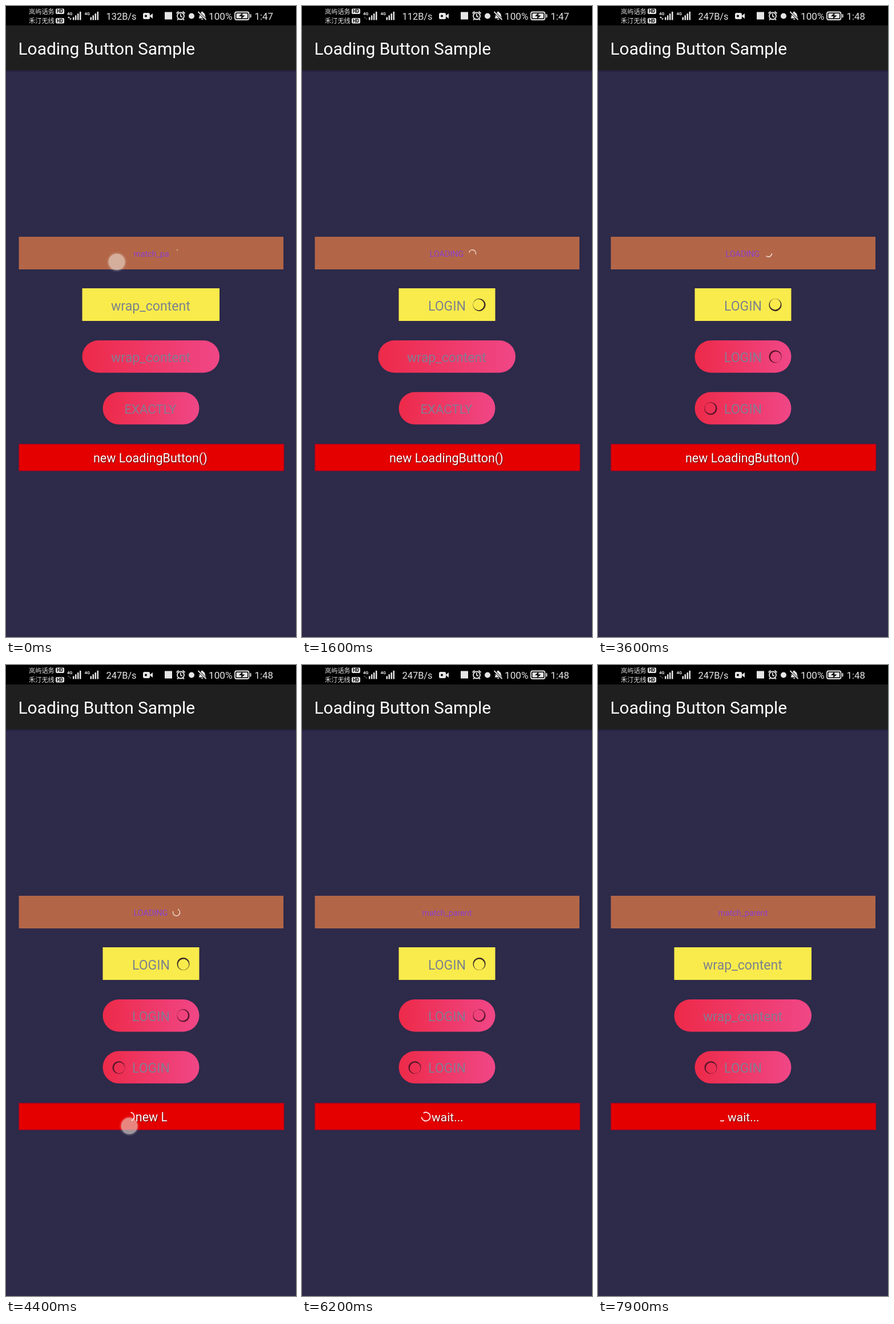
Write an HTML page that moves like this. It is 508x1102 px and loops after 8 s.

```html
<!DOCTYPE html>
<html lang="en">
<head>
<meta charset="utf-8">
<title>Loading Button Sample</title>
<style>
html, body { margin: 0; width: 100%; height: 100%; overflow: hidden; background: #2d2a4a; }
svg#stage { display: block; width: 100vw; height: 100vh; }
text { font-family: Roboto, "Open Sans", sans-serif; white-space: pre; }
.cjk { font-family: "Noto Sans CJK SC", "Noto Sans CJK", sans-serif; font-size: 11.2px; }
.status { fill: #e6e6e6; }
.line { fill: none; stroke: #e6e6e6; stroke-width: 1.8; }
.box { filter: blur(.45px); }
</style>
</head>
<body>
<svg id="stage" viewBox="0 0 508 1102" preserveAspectRatio="none">
  <defs>
    <linearGradient id="pink"><stop stop-color="#ed2a49"/><stop offset="1" stop-color="#f04787"/></linearGradient>
    <linearGradient id="shade" x2="0" y2="1"><stop stop-color="#15142a" stop-opacity=".6"/><stop offset="1" stop-color="#15142a" stop-opacity="0"/></linearGradient>
    <radialGradient id="halo"><stop offset=".75" stop-color="#fff" stop-opacity=".2"/><stop offset="1" stop-color="#fff" stop-opacity="0"/></radialGradient>
  </defs>
  <rect width="508" height="1102" fill="#2d2a4a"/>
  <rect width="508" height="34" fill="#000"/>
  <rect y="34" width="508" height="78" fill="#1f1f1f"/>
  <rect y="112" width="508" height="4" fill="url(#shade)"/>
  <text x="21.5" y="85.3" font-size="29.9" fill="#fff">Loading Button Sample</text>

  <g class="status">
    <text class="cjk" x="40" y="13.5">岚屿话务</text>
    <text class="cjk" x="40" y="30">禾汀无线</text>
    <g id="badges"></g>
    <g id="signals"></g>
    <path id="arrows" d="M108 21l2-3 2 3zM111 21.5h4l-2 3z"/>
    <text id="speed" x="175.5" y="24" font-size="16.4"></text>
    <rect x="240" y="12" width="12" height="11" rx="2.5"/>
    <path d="M252 17l5-4v9l-5-4z"/>
    <circle cx="245" cy="17.5" r="2" fill="#000"/>
    <rect x="278" y="10.5" width="13" height="13"/>
    <circle class="line" cx="306" cy="17.5" r="6"/>
    <path class="line" d="M306 13.5v4.5l3 1.5M298.5 13l4-3.5M313.5 13l-4-3.5M302 22.5l-2 2M310 22.5l2 2"/>
    <circle cx="325" cy="17.5" r="5"/>
    <path d="M337.5 21.5c2-2 1-9 4-10 1-2.5 3-2.5 4 0 4 1 3 8 5 10zM341.5 22.8h4.5q-2.2 3-4.5 0z"/>
    <path d="M337 10.5l14 14" stroke="#000" stroke-width="3.5"/>
    <path class="line" d="M336.5 10l14 14"/>
    <text x="355" y="24" font-size="17.2">100%</text>
    <rect class="line" x="401" y="10.5" width="24.5" height="13.5" rx="3"/>
    <rect x="403.5" y="13" width="19.5" height="8.5" rx="1"/>
    <path d="M414.5 11.5l-6.5 6.5h4.5l-1 5 7-6.5h-4.5z" fill="#000"/>
    <rect x="427.5" y="14" width="2" height="6.5" rx="1"/>
    <text id="clock" x="435.5" y="24" font-size="16.8"></text>
  </g>
  <g id="buttons"></g>
  <g id="touch">
    <circle r="18.5" fill="url(#halo)"/>
    <circle r="14.5" fill="#e8d8cc" fill-opacity=".5"/>
  </g>
</svg>
<script>
const LOOP = 8000, STEP = 100, SHRINK = 160, CYCLE = 1332;
const $ = id => document.getElementById(id);

function add(parent, tag, attrs = {}) {
  const node = document.createElementNS('http://www.w3.org/2000/svg', tag);
  set(node, attrs);
  parent.append(node);
  return node;
}
function set(node, attrs) {
  for (const key in attrs) node.setAttribute(key, attrs[key]);
}
const clamp = v => Math.max(0, Math.min(1, v));
const mix = (a, b, k) => a + (b - a) * k;
const show = (node, on) => set(node, { visibility: on ? 'visible' : 'hidden' });

for (const y of [4.5, 21]) {
  add($('badges'), 'rect', { x: 87, y, width: 15, height: 9.5, rx: 2 });
  add($('badges'), 'text', { x: 89, y: y + 7.8, 'font-size': 8.2, 'font-weight': 700, fill: '#000' }).textContent = 'HD';
}
for (const x of [107, 137.5]) {
  add($('signals'), 'text', { x, y: 16, 'font-size': 7.6, 'font-weight': 700 }).textContent = '4G';
  for (let i = 0; i < 4; i++) {
    const height = 5 + i * 3.2;
    add($('signals'), 'rect', { x: x + 10 + i * 4, y: 24.5 - height, width: 2.5, height });
  }
}

// wide and narrow are [left, right] of the box; idleText and busyText of the label
const LOGIN = [221, 288], FULL = [22.5, 486], WIDE = [133.5, 374], NARROW = [169.5, 338.5];
const GREY = '#867b92', DARK = '#58152a';
const buttons = [
  { y: 403, h: 57, wide: FULL, narrow: FULL, fill: '#b36647', color: '#8a40cf',
    idle: 'match_parent', busy: 'LOADING', idleSize: 14.2, busySize: 14.4, base: 437.6,
    idleText: [210.5, 298], busyText: [223.5, 286], click: -150, end: 4850, touch: [194, 447],
    arc: { x: 298.5, y: 432, r: 6, width: 1.4, color: '#f4e2da', offset: 3985, turn: 0 } },
  { y: 493, h: 57, wide: WIDE, narrow: NARROW, fill: '#f9eb4b', color: '#7c828e',
    idle: 'wrap_content', busy: 'LOGIN', idleSize: 23.1, busySize: 23.1, base: 531.5,
    idleText: [184, 323], busyText: LOGIN, click: 1300, end: 6400, touch: [220, 532],
    ring: { x: 310.5, y: 522, color: '#3d2b27', at: 1600, angle: 20 } },
  { y: 584, h: 56.5, wide: WIDE, narrow: NARROW, fill: 'url(#pink)', color: GREY, rx: 28.2,
    idle: 'wrap_content', busy: 'LOGIN', idleSize: 23.1, busySize: 23.1, base: 622,
    idleText: [184, 323], busyText: LOGIN, click: 2150, end: 7250, touch: [221, 627],
    ring: { x: 310.5, y: 612.3, color: DARK, at: 3600, angle: 220 } },
  { y: 674.3, h: 56.5, wide: NARROW, narrow: NARROW, fill: 'url(#pink)', color: GREY, rx: 28.2,
    idle: 'EXACTLY', busy: 'LOGIN', idleSize: 22.2, busySize: 23.1, base: 712.5,
    idleText: [207.5, 302], busyText: LOGIN, click: 3150, end: 9000, touch: [222, 716],
    ring: { x: 197.5, y: 703, color: DARK, at: 3600, angle: 40 } },
  { y: 765.5, h: 46, wide: [23, 486.5], narrow: [23, 486.5], fill: '#e50000', color: '#fff', border: '#b8001a',
    idle: 'new LoadingButton()', busy: 'wait...', idleSize: 21.5, busySize: 21, base: 797,
    idleText: [153, 355], busyText: [227, 282], click: 4250, end: 9000, touch: [216, 805],
    arc: { x: 217, y: 788.8, r: 7.6, width: 1.6, color: '#fff', offset: -2845, turn: 22 } }
];

for (const b of buttons) {
  const group = $('buttons');
  b.box = add(group, 'rect', { class: 'box', y: b.y, height: b.h, rx: b.rx || 0, fill: b.fill });
  if (b.border) set(b.box, { stroke: b.border, 'stroke-width': 1.5 });
  b.window = add(group, 'svg', { y: b.y, height: b.h });
  b.label = add(b.window, 'text', { x: 0, y: b.base - b.y, fill: b.color });
  if (b.border) b.label.style.textShadow = '1px 1px 2px #0009';
  // The ring is a crescent: a circle with a slightly shifted hole.
  b.spinner = b.arc
    ? add(group, 'path', { fill: 'none', stroke: b.arc.color, 'stroke-width': b.arc.width, 'stroke-linecap': 'square' })
    : add(group, 'path', { fill: b.ring.color, 'fill-rule': 'evenodd',
        d: 'M11 0A11 11 0 1 1-11 0A11 11 0 1 1 11 0zM8.4 0A9.55 9.55 0 1 1-10.7 0A9.55 9.55 0 1 1 8.4 0z' });
}

// cubic-bezier(.4, 0, .2, 1)
function ease(x) {
  let lo = 0, hi = 1, s = .5;
  for (let i = 0; i < 20; i++) {
    s = (lo + hi) / 2;
    const bx = 3 * (1 - s) ** 2 * s * .4 + 3 * (1 - s) * s * s * .2 + s ** 3;
    if (bx < x) lo = s; else hi = s;
  }
  return 3 * (1 - s) * s * s + s ** 3;
}

// An arc that grows for half a cycle, then its tail catches up, while it all turns.
function arcPath({ x, y, r, offset, turn }, t) {
  const cycles = (t + offset) / CYCLE + 10;
  const p = cycles % 1;
  const grown = p < .5 ? ease(p * 2) : 1 - ease(p * 2 - 1);
  const sweep = 360 * (.79 * grown + .01);
  const spin = 216 * cycles + 75.6 * p + turn;
  const start = p < .5 ? spin : spin + 284.4 - sweep;
  const point = deg => {
    const a = deg * Math.PI / 180;
    return `${x + r * Math.cos(a)} ${y + r * Math.sin(a)}`;
  };
  return `M${point(start)}A${r} ${r} 0 ${sweep > 180 ? 1 : 0} 1 ${point(start + sweep)}`;
}

function drawButton(b, t) {
  const active = t >= b.click && t < b.end;
  const k = t < b.end ? ease(clamp((t - b.click) / SHRINK)) : 1 - ease(clamp((t - b.end) / 200));
  const busy = active && t >= b.click + SHRINK;
  const moving = k > 0 && k < 1;
  const left = mix(b.wide[0], b.narrow[0], k), right = mix(b.wide[1], b.narrow[1], k);
  set(b.box, { x: left, width: right - left });

  const textLeft = mix(b.idleText[0], b.busyText[0], k);
  const textRight = mix(b.idleText[1], b.busyText[1], k);
  set(b.window, { x: textLeft, width: moving ? textRight - textLeft : 260 });
  b.label.textContent = busy ? b.busy : b.idle;
  set(b.label, { 'font-size': busy ? b.busySize : b.idleSize });

  show(b.spinner, active);
  if (b.arc) set(b.spinner, { d: arcPath(b.arc, t) });
  else {
    const angle = b.ring.angle + (t - b.ring.at) * 360 / 1700;
    set(b.spinner, { transform: `translate(${b.ring.x} ${b.ring.y}) rotate(${angle})` });
  }
}

function drawTouch(t) {
  const b = buttons.find(({ click }) => t >= click - 150 && t < click + 300);
  show($('touch'), b);
  if (b) set($('touch'), { transform: `translate(${b.touch})`, opacity: 1 - clamp((t - b.click - 150) / 150) });
}

function draw(t) {
  buttons.forEach(b => drawButton(b, t));
  drawTouch(t);
  $('speed').textContent = t < 500 ? '132B/s' : t < 3400 ? '112B/s' : '247B/s';
  $('clock').textContent = t < 2600 ? '1:47' : '1:48';
  const traffic = [[0, 700], [3400, 4000], [5700, 6000], [7400, 7700]].some(([a, z]) => t >= a && t < z);
  set($('arrows'), { opacity: traffic ? 1 : .3 });
}

const begin = performance.now();
function tick() {
  const t = (performance.now() - begin) % LOOP;
  draw(Math.floor(t / STEP) * STEP);
  requestAnimationFrame(tick);
}
tick();
</script>
</body>
</html>
```
